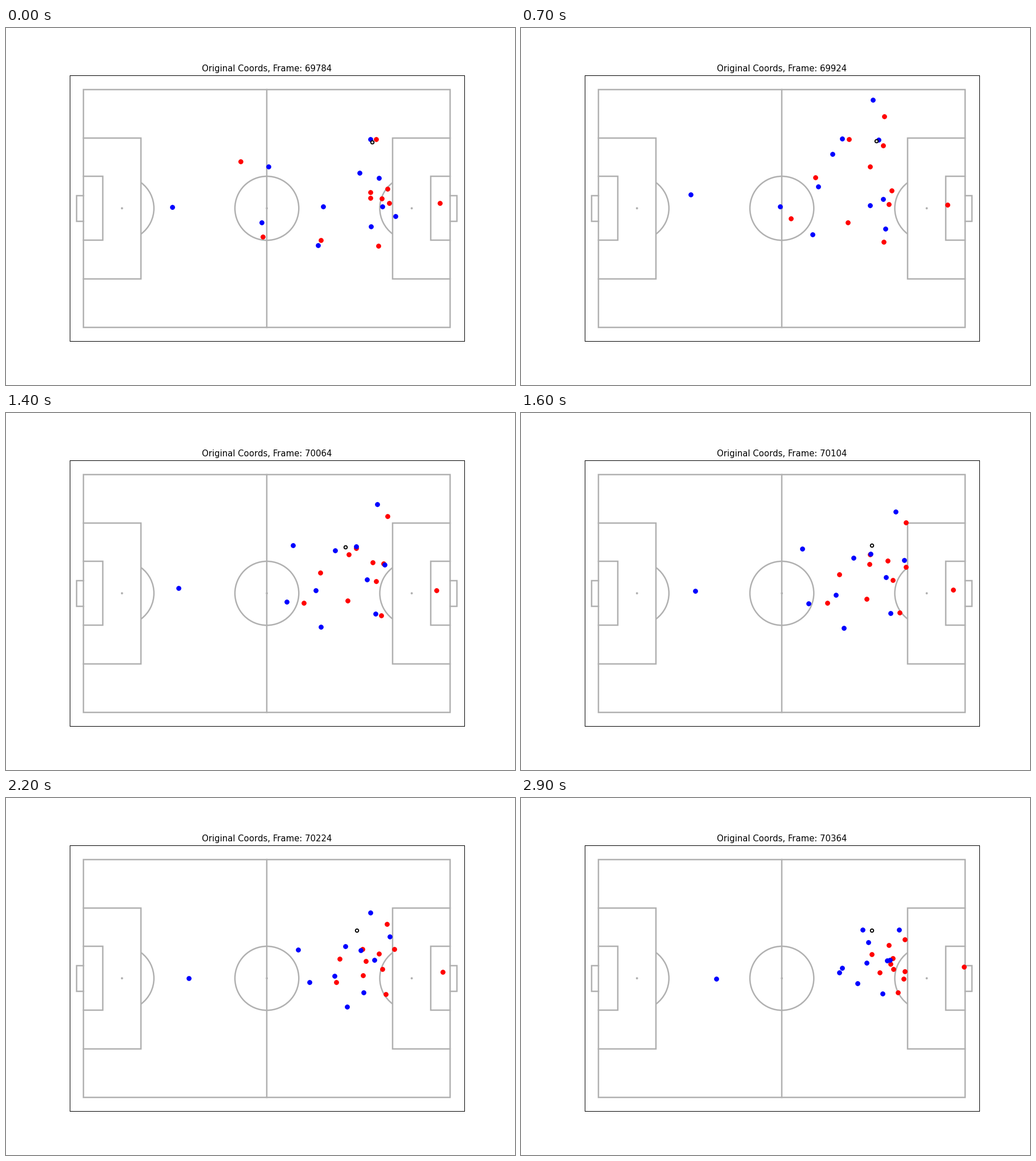
Animation, 894 px wide and 626 px high, one loop 3000 ms. Source, as a matplotlib script:

```python
import matplotlib.pyplot as plt
import numpy as np
from matplotlib.animation import FuncAnimation
from matplotlib.patches import Arc, Circle, Rectangle

W, H, DPI = 894, 626, 100
PT = 0.894  # scale of all point sizes
FRAMES, INTERVAL = 30, 100
FIRST_COUNT, COUNT_STEP = 69784, 20
LENGTH, WIDTH, PAD = 105, 68, 4
LINE = "#b0b0b0"

SCALE = 0.775 * W / (LENGTH + 2 * PAD)  # pixels per metre
CENTRE = np.array([0.5125 * W, 0.505 * H])

plt.rcParams["font.family"] = "DejaVu Sans"
fig = plt.figure(figsize=(W / DPI, H / DPI), dpi=DPI, facecolor="white")
ax = fig.add_subplot()
ax.set_xlim(-LENGTH / 2 - PAD, LENGTH / 2 + PAD)
ax.set_ylim(-WIDTH / 2 - PAD, WIDTH / 2 + PAD)
ax.set_aspect("equal")
ax.set_xticks([])
ax.set_yticks([])
for spine in ax.spines.values():
    spine.set_linewidth(0.8 * PT)


def draw_pitch():
    half = LENGTH / 2
    stroke = dict(lw=2 * PT, zorder=1)
    outline = dict(fill=False, ec=LINE, **stroke)

    def path(xs, ys):
        ax.plot(xs, ys, color=LINE, solid_joinstyle="miter", **stroke)

    def spot(x):
        ax.add_patch(Circle((x, 0), 0.21, color=LINE, lw=PT, zorder=1))

    ax.add_patch(Rectangle((-half, -WIDTH / 2), LENGTH, WIDTH, **outline))
    path([0, 0], [-WIDTH / 2, WIDTH / 2])
    ax.add_patch(Circle((0, 0), 9.15, **outline))
    spot(0)
    bend = np.degrees(np.arccos(5.5 / 9.15))
    for side in (-1, 1):
        # penalty area, goal area, and the goal behind the line
        for depth, span in ((16.5, 40.32), (5.5, 18.32), (-2, 7.32)):
            edge, y = side * (half - depth), span / 2
            path([side * half, edge, edge, side * half], [-y, -y, y, y])
        x = side * (half - 11)
        spot(x)
        facing = 180 if side > 0 else 0
        ax.add_patch(Arc((x, 0), 18.3, 18.3, theta1=facing - bend,
                         theta2=facing + bend, color=LINE, **stroke))


def to_pitch(pixels):
    return (np.array(pixels, float) - CENTRE) / (SCALE, -SCALE)


def run(*points, keys=(0, 7, 16, 29)):
    """Smooth path of a player: a Hermite curve through the key points."""
    k, p = np.array(keys, float), to_pitch(points)
    slope = np.gradient(p, k, axis=0)
    t = np.arange(FRAMES)
    i = np.clip(np.searchsorted(k, t, side="right") - 1, 0, len(k) - 2)
    h = (k[i + 1] - k[i])[:, None]
    u = (t - k[i])[:, None] / h
    ease = u * u * (3 - 2 * u)
    return (p[i] + ease * (p[i + 1] - p[i])
            + h * u * (1 - u) * ((1 - u) * slope[i] - u * slope[i + 1]))


def passes(*points, keys=(0, 7, 11, 16)):
    """Straight passes between the key points, then at rest."""
    x, y = to_pitch(points).T
    t = np.arange(FRAMES)
    return np.stack([np.interp(t, keys, x), np.interp(t, keys, y)], axis=1)


blue = [
    run((292, 314), (298, 292), (306, 312), (343, 317)),
    run((640, 195), (618, 126), (658, 173), (600, 231)),
    run((461, 243), (547, 221), (494, 238), (559, 306)),
    run((621, 254), (564, 194), (584, 254), (610, 253)),
    run((655, 263), (628, 196), (614, 247), (643, 285)),
    run((557, 313), (522, 278), (553, 319), (607, 289)),
    run((661, 313), (613, 311), (641, 288), (648, 284)),
    run((684, 330), (636, 300), (673, 258), (664, 231)),
    run((641, 348), (640, 352), (649, 351), (591, 325)),
    run((449, 341), (455, 313), (505, 334), (564, 298)),
    run((548, 381), (512, 362), (567, 377), (635, 343)),
]
red = [
    run((762, 307), (749, 310), (759, 310), (778, 296)),
    run((650, 195), (638, 155), (676, 192), (646, 258)),
    run((412, 234), (517, 262), (559, 283), (616, 274)),
    run((640, 288), (576, 195), (612, 265), (654, 300)),
    run((670, 282), (636, 206), (613, 248), (653, 281)),
    run((640, 298), (613, 243), (676, 270), (674, 248)),
    run((660, 299), (651, 285), (644, 259), (674, 304)),
    run((673, 307), (646, 309), (653, 293), (672, 317)),
    run((451, 366), (474, 334), (538, 333), (630, 306)),
    run((553, 372), (574, 341), (607, 326), (649, 291)),
    run((654, 382), (637, 375), (665, 350), (662, 341)),
]
ball = [passes((643, 200), (624, 198), (566, 240), (616, 232))]


def dots(color, zorder, size=6, rim=1, **style):
    return ax.plot([], [], "o", color=color, zorder=zorder, ms=size * PT,
                   mew=rim * PT, **style)[0]


draw_pitch()
layers = [
    (dots("red", 3), np.array(red)),
    (dots("blue", 4), np.array(blue)),
    (dots("white", 5, size=4.5, rim=1.5, mec="black"), np.array(ball)),
]
title = ax.set_title("", fontsize=12 * PT, pad=6 * PT)


def update(i):
    for line, paths in layers:
        line.set_data(*paths[:, i].T)
    title.set_text(f"Original Coords, Frame: {FIRST_COUNT + COUNT_STEP * i}")
    return [line for line, _ in layers] + [title]


anim = FuncAnimation(fig, update, frames=FRAMES, interval=INTERVAL,
                     repeat=True, repeat_delay=0)
plt.show()
```
